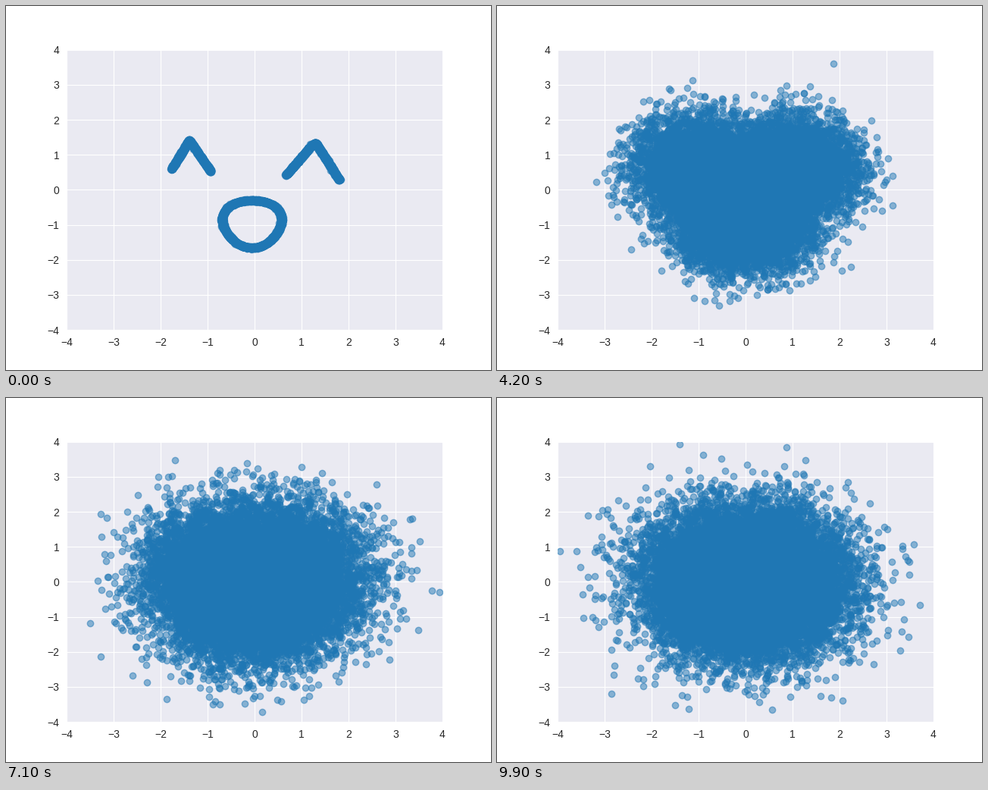
Write a matplotlib script that moves like this. It is 640x480 px and loops after 10000 ms.

```python
import numpy as np
import matplotlib.pyplot as plt
from matplotlib.animation import FuncAnimation

STEPS = 100
POINTS = 16000
OFFSET = 0.008

plt.rcParams.update({
    "font.family": "Liberation Sans",
    "axes.facecolor": "#EAEAF2",
    "axes.linewidth": 0,
    "axes.axisbelow": True,
    "axes.grid": True,
    "grid.color": "white",
    "xtick.color": ".15",
    "ytick.color": ".15",
    "xtick.major.size": 0,
    "ytick.major.size": 0,
    "xtick.major.pad": 7,
    "ytick.major.pad": 7,
})


def mouth():
    """An ellipse flattened at the top and full at the upper corners."""
    a = np.linspace(0, 2 * np.pi, 90)
    r = 1 + 0.05 * np.sin(3 * a)
    return np.c_[-0.055 + 0.624 * r * np.cos(a), -0.944 + 0.675 * r * np.sin(a)]


def arc(stroke):
    """Distance travelled at each vertex of a polyline."""
    return np.r_[0, np.cumsum(np.hypot(*np.diff(stroke, axis=0).T))]


def sample(stroke, n):
    """Spread n points evenly along a polyline."""
    s = arc(stroke)
    d = np.linspace(0, s[-1], n)
    return np.column_stack([np.interp(d, s, c) for c in np.transpose(stroke)])


def make_face():
    left_eye = [(-1.766, 0.59), (-1.387, 1.415), (-0.935, 0.53)]
    right_eye = [(0.677, 0.43), (1.24, 1.307), (1.307, 1.33), (1.806, 0.28)]
    strokes = [left_eye, right_eye, mouth()]
    total = sum(arc(s)[-1] for s in strokes)
    return np.vstack([sample(s, round(POINTS * arc(s)[-1] / total))
                      for s in strokes])


def diffuse(x0, step):
    """Forward diffusion with a cosine noise schedule."""
    angle = (step / STEPS + OFFSET) / (1 + OFFSET) * np.pi / 2
    noise = np.random.default_rng(step).normal(size=x0.shape)
    return np.cos(angle) * x0 + np.sin(angle) * noise


face = make_face()
fig, ax = plt.subplots(figsize=(6.4, 4.8), dpi=100)
ax.set(xlim=(-4, 4), ylim=(-4, 4), xticks=range(-4, 5), yticks=range(-4, 5))
dots = ax.scatter(*face.T, color="#1f77b4", alpha=0.5)


def update(step):
    dots.set_offsets(diffuse(face, step))
    return dots,


anim = FuncAnimation(fig, update, frames=STEPS, interval=100,
                     repeat=True, repeat_delay=0)
plt.show()
```
